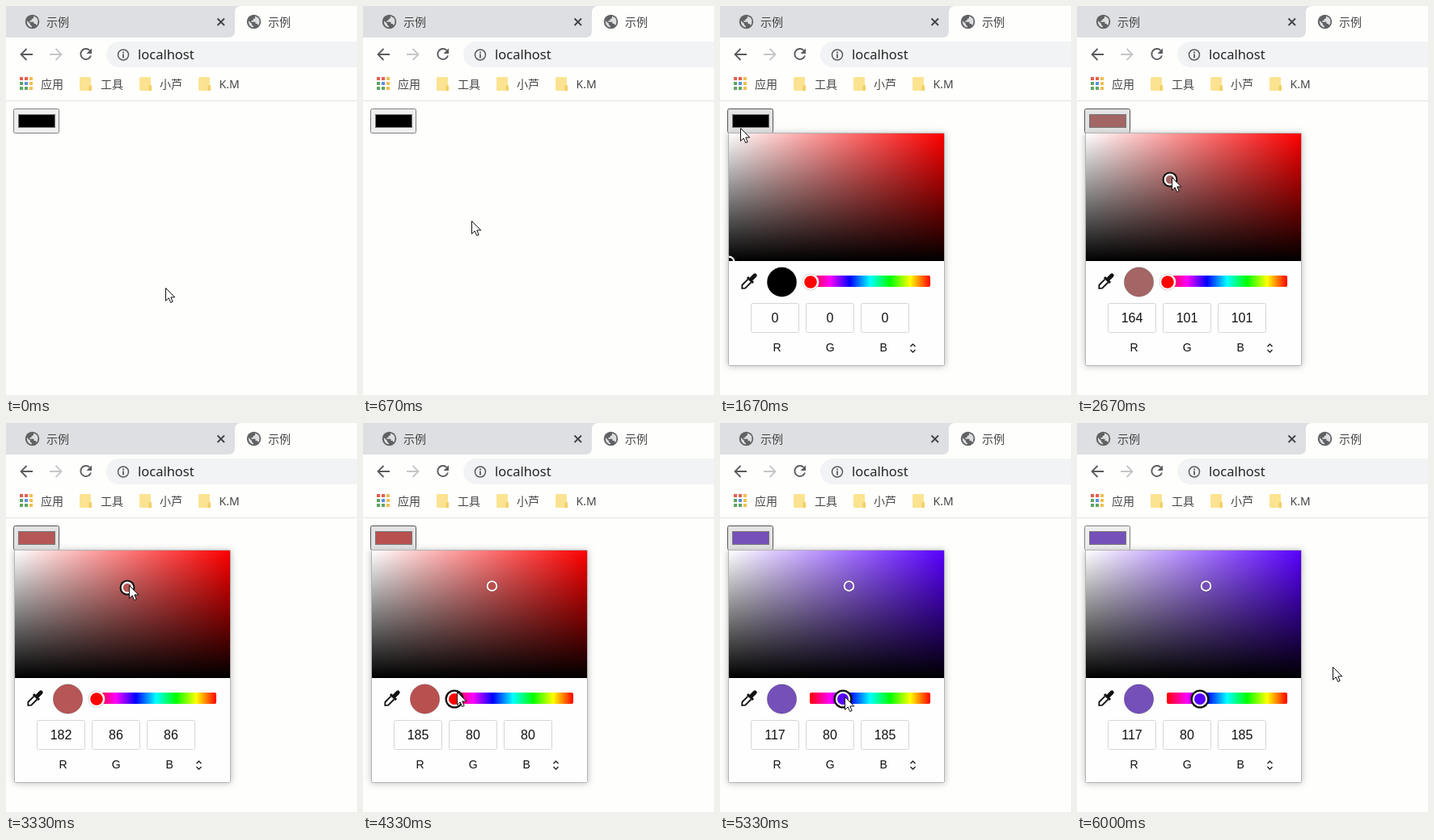
Recreate the animation shown at these times as an HTML page. Size 434 by 482 pixels, loop 6330 ms.

```html
<!DOCTYPE html>
<html lang="zh">
<head>
<meta charset="utf-8">
<title>示例</title>
<style>
  html, body { margin: 0; height: 100%; overflow: hidden; background: #fefefd; }
  svg { display: block; width: 434px; height: 482px; }
  text { font: 14px "Noto Sans CJK SC", "Noto Sans CJK", sans-serif; fill: #454545; }
  .latin { font-family: "Noto Sans", "Open Sans", sans-serif; }
  .url { font-size: 16.5px; fill: #252525; }
  #popup text { font: 14px "Liberation Sans", Arial, sans-serif; fill: #111; text-anchor: middle; }
  #popup .value { font-size: 16px; }
  .line { fill: none; stroke: #595b5e; stroke-width: 1.8; }
</style>
</head>
<body>
<svg viewBox="0 0 434 482">
  <defs>
    <g id="globe">
      <circle r="8.7" fill="#606264"/>
      <path d="M-6.800-1.500L-2.500 2.500V4L-.5 5.500V7Q-6.500 6.500-6.800-1.500ZM1.500-6.900V-5Q1-3.300-1-3.300V-1.500H-3V.2H2V2.500H4L5.500 4.500Q8.500-.5 5.500-4.800Z" fill="#dcdedf"/>
    </g>
    <g id="folder">
      <path d="M0 1.500Q0 0 1.500 0H13Q14 0 14 1V9.500L15 10.500V15.500Q15 17 13.500 17H1.500Q0 17 0 15.500Z" fill="#fbe391"/>
      <path d="M11.500 10.500H15V17H11.500Z" fill="#f2cf63"/>
    </g>
    <linearGradient id="sat"><stop stop-color="#fff"/><stop id="pure" offset="1"/></linearGradient>
    <linearGradient id="dark" x2="0" y2="1"><stop stop-opacity="0"/><stop offset="1"/></linearGradient>
    <linearGradient id="rainbow"></linearGradient>
    <filter id="glow" x="-10%" y="-10%" width="120%" height="120%"><feGaussianBlur stdDeviation="4"/></filter>
    <clipPath id="well"><rect x="11" y="158" width="266" height="158"/></clipPath>
  </defs>

  <!-- browser frame -->
  <path d="M0 0H291Q283 0 283 8V31Q283 39 275 39H0Z" fill="#dddfe2"/>
  <use href="#globe" x="32.500" y="19.500"/>
  <text x="50" y="25">示例</text>
  <path d="M261.500 15.500l8.500 8.500m0-8.500l-8.500 8.500" class="line" style="stroke:#404244"/>
  <use href="#globe" x="306.500" y="19.500"/>
  <text x="324" y="25">示例</text>
  <path d="M33 60H19M25.500 53L18.500 60L25.500 67" class="line"/>
  <path d="M54 60H68M61.500 53L68.500 60L61.500 67" class="line" style="stroke:#c4c6c8"/>
  <path d="M103.500 55A6.500 6.500 0 1 0 105 61.500" class="line"/>
  <path d="M106 52.500V59H99.500Z" fill="#595b5e"/>
  <path d="M434 44H140a16 16 0 0 0 0 32H434Z" fill="#f2f3f4"/>
  <circle cx="145" cy="60.500" r="6.500" class="line" style="stroke-width:1.500"/>
  <path d="M145 56.500v2m0 1v5" class="line"/>
  <text x="163" y="66" class="latin url">localhost</text>
  <g id="apps"></g>
  <text x="43" y="102">应用</text>
  <use href="#folder" x="91" y="88"/>
  <text x="117" y="102">工具</text>
  <use href="#folder" x="165" y="88"/>
  <text x="190" y="102">小芦</text>
  <use href="#folder" x="238" y="88"/>
  <text x="263.500" y="102" class="latin">K.M</text>
  <path d="M0 117.500H434" stroke="#e2e3e4"/>

  <!-- colour button -->
  <rect id="button" x="9.500" y="127.500" width="56" height="30" rx="2"/>
  <rect id="swatch" x="15.500" y="134.500" width="45" height="16" stroke="#777"/>

  <g id="popup">
    <rect x="10" y="158" width="268" height="288" fill="#b8b8b8" filter="url(#glow)"/>
    <rect x="10.500" y="157.500" width="267" height="288" rx="1" fill="#fefefe" stroke="#b4b4b4"/>
    <rect x="11" y="158" width="266" height="158" fill="url(#sat)"/>
    <rect x="11" y="158" width="266" height="158" fill="url(#dark)"/>
    <g clip-path="url(#well)"><g id="marker"></g></g>
    <g transform="translate(35 342) rotate(45)">
      <path d="M-2.500-11.500a2.500 2.500 0 0 1 5 0V-5H5V-2H-5V-5H-2.500Z" fill="#111"/>
      <path d="M-2.700-2V8L0 11L2.700 8V-2" fill="none" stroke="#111" stroke-width="1.800"/>
    </g>
    <circle id="preview" cx="76.500" cy="342" r="18.200" stroke="#00000030"/>
    <rect x="111" y="334" width="149" height="14" rx="2" fill="url(#rainbow)"/>
    <g id="thumb"></g>
    <g id="fields"></g>
    <path d="M235.500 422l3-3l3 3m0 4l-3 3l-3-3" class="line" style="stroke:#222;stroke-width:1.400"/>
  </g>

  <path id="cursor" d="M.5.500V16.300L4.200 12.800L6.700 18.500L9.200 17.400L6.800 11.900H11.800Z" fill="#fff" stroke="#111" stroke-linejoin="round"/>
</svg>
<script>
const $ = id => document.getElementById(id);
const set = (id, attrs) => { for (const k in attrs) $(id).setAttribute(k, attrs[k]); };
const LOOP = 6330, HOVER = 1330, OPEN = 1670, HUE_FOCUS = 4330, LEAVE = 6000;

// Each track: [start ms, x, y], held until the next entry.
const pointer = [
  [0, 197, 349], [670, 134, 266], [1000, 38, 170], [1330, 25, 151], [2000, 62, 206],
  [2330, 102, 223], [2670, 117, 212], [3000, 136, 207], [3330, 152, 201], [3670, 161, 199],
  [4000, 134, 286], [4330, 116, 333], [4670, 158, 336], [5000, 160, 337], [5330, 154, 339],
  [5670, 190, 336], [6000, 316, 302]
];
const picks = [
  [0, 11, 317], [2330, 100, 226], [2670, 115, 215], [3000, 134, 210], [3330, 150, 204], [3670, 159.5, 202]
];
const hues = [[0, 111], [4670, 153], [5000, 155], [5330, 152]];
const at = (track, t) => track.findLast(k => k[0] <= t).slice(1);
const clamp = v => Math.min(1, Math.max(0, v));

function toRGB(hue, x, y) {
  const max = Math.round(255 * clamp(1 - (y - 158.6) / 158));
  const min = max * (1 - clamp((x - 21.7) / 243.4));
  return [0, 240, 120].map(shift => {
    const d = Math.abs((hue + shift) % 360 - 180);
    return Math.round(min + (max - min) * clamp(d / 60 - 1));
  });
}

const disc = (r, fill) => `<circle r="${r}" fill="${fill}"/>`;

$("rainbow").innerHTML = [0, 1, 2, 3, 4, 5, 6]
  .map(i => `<stop offset="${i / 6}" stop-color="hsl(${360 - i * 60} 100% 50%)"/>`).join("");
const [red, gold, green, blue] = ["#e4604f", "#efc050", "#5fa564", "#5b92e0"];
$("apps").innerHTML = [red, red, gold, green, blue, gold, green, green, gold]
  .map((c, i) => `<rect x="${17 + i % 3 * 6}" y="${88 + (i / 3 | 0) * 6}" width="4" height="4" fill="${c}"/>`).join("");
$("fields").innerHTML = [..."RGB"].map((name, i) => {
  const x = 38.5 + i * 68;
  return `<rect x="${x}" y="368.500" width="59" height="36" rx="2" fill="#fefefe" stroke="#d6d6d6"/>
    <text class="value" x="${x + 29.5}" y="392"></text><text x="${70.5 + i * 65.8}" y="428">${name}</text>`;
}).join("");
const values = document.querySelectorAll(".value");

function draw(now) {
  const t = now % LOOP;
  const [cx, cy] = at(pointer, t), [mx, my] = at(picks, t), [hx] = at(hues, t);
  const hue = 360 * (260 - hx) / 149;
  const rgb = toRGB(hue, mx, my);
  const color = `rgb(${rgb})`, pure = `hsl(${hue} 100% 50%)`;
  const onHue = t >= HUE_FOCUS, hover = t >= HOVER && t < LEAVE;

  set("cursor", { transform: `translate(${cx} ${cy})` });
  set("button", { fill: hover ? "#e3e3e4" : "#eeeeef", stroke: hover ? "#555" : "#808080" });
  set("swatch", { fill: color });
  set("popup", { visibility: t < OPEN ? "hidden" : "visible" });
  set("pure", { "stop-color": pure });
  set("preview", { fill: color });
  set("marker", { transform: `translate(${mx} ${my})` });
  set("thumb", { transform: `translate(${onHue ? Math.max(hx, 113) : 112} 342)` });
  $("marker").innerHTML = onHue
    ? disc(7.3, "#0004") + disc(6.8, "#fff") + disc(4.9, color)
    : disc(9.5, "#111") + disc(7.4, "#fff") + disc(5.2, color);
  $("thumb").innerHTML = onHue
    ? disc(11.5, "#111") + disc(9.2, "#fff") + disc(7, pure)
    : disc(10.5, "#ccc") + disc(9.8, "#fff") + disc(7.8, pure);
  rgb.forEach((v, i) => values[i].textContent = v);
}

function tick(now) {
  draw(now);
  requestAnimationFrame(tick);
}
draw(0);
requestAnimationFrame(tick);
</script>
</body>
</html>
```
